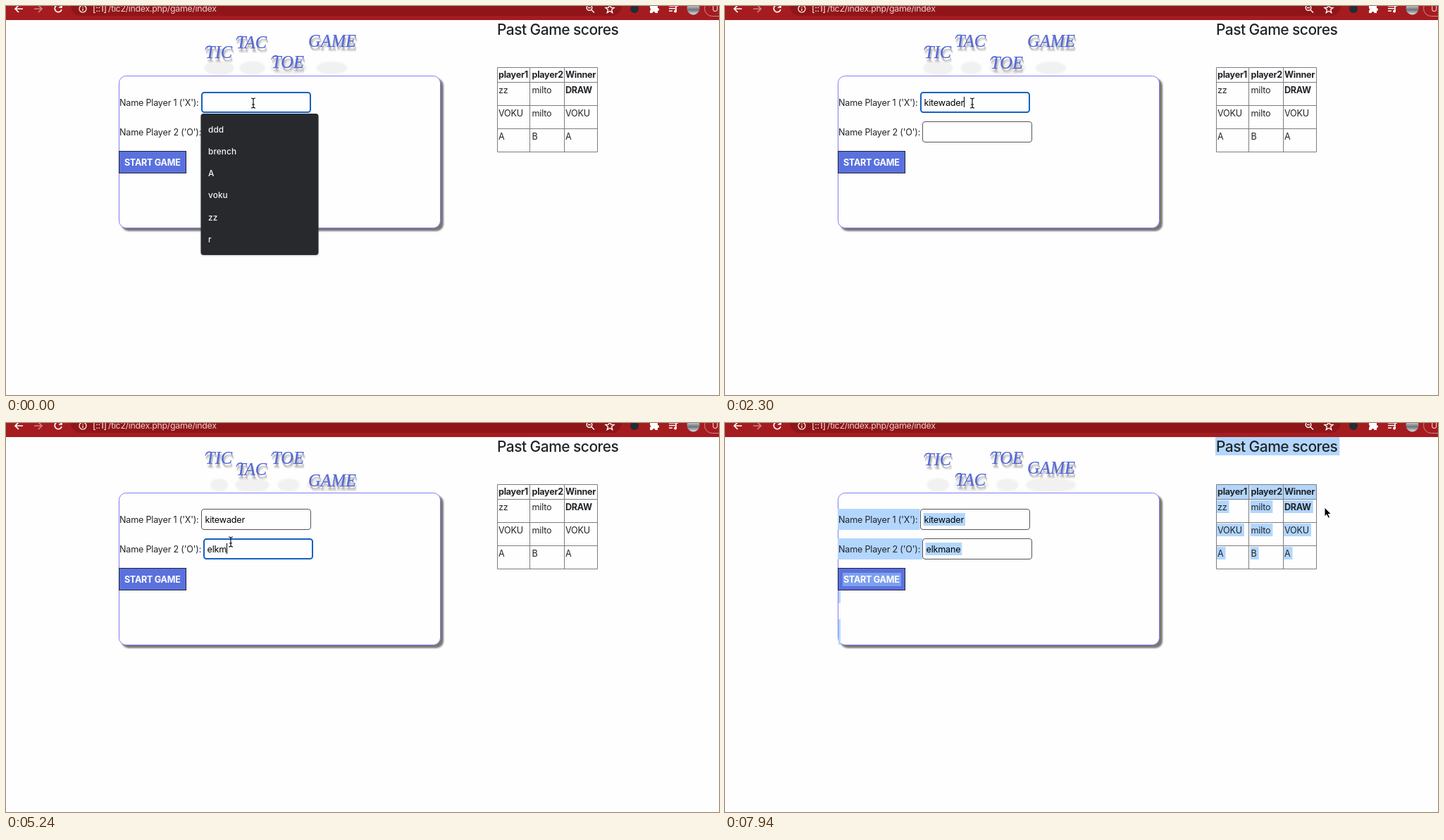
Write an HTML page that moves like this. It is 1012 by 553 pixels and loops after 8 s.

```html
<!DOCTYPE html>
<html lang="en">
<head>
<meta charset="utf-8">
<title>Tic Tac Toe</title>
<style>
  html, body { margin: 0; width: 100%; height: 100%; overflow: hidden; background: #fefefe; }
  svg { display: block; width: 1012px; height: 553px; }
  text { font: 12.6px Inter, "Open Sans", sans-serif; letter-spacing: -.2px; fill: #212529; white-space: pre; }
  .bold { font-weight: 700; letter-spacing: -.28px; }
  .typed { fill: #000; }
  .heading { font-size: 21px; font-weight: 500; letter-spacing: -.55px; }
  .url { font-size: 12.4px; letter-spacing: -.3px; fill: #eccfd0; }
  .item { font-size: 11.8px; font-weight: 500; letter-spacing: .1px; fill: #f4f4f5; }
  .word text { font: italic 24.5px "Liberation Serif", serif; letter-spacing: 0; stroke-width: .25; }
  .icon { fill: none; stroke: #fff; stroke-width: 1.7; }
</style>
</head>
<body>
<svg viewBox="0 0 1012 553">
  <defs>
    <filter id="soft" x="-10%" y="-10%" width="120%" height="120%"><feGaussianBlur stdDeviation="1"/></filter>
    <linearGradient id="face" x2="0" y2="1">
      <stop offset=".2" stop-color="#d5dadd"/><stop offset=".6" stop-color="#6d767c"/><stop offset="1" stop-color="#dde1e3"/>
    </linearGradient>
  </defs>

  <g id="title"></g>

  <rect x="164" y="103" width="457" height="217" rx="10" fill="#777" filter="url(#soft)"/>
  <rect x="160.5" y="99.5" width="456" height="216" rx="10" fill="#fefefe" stroke="#7d7df0"/>
  <g id="marks" fill="#b3d6fd"></g>
  <g id="labels"></g>
  <g id="fields"></g>
  <rect x="160.5" y="206.5" width="95" height="31" fill="#5a71de" stroke="#20243c"/>
  <rect id="buttonMark" x="167" y="213" width="83" height="19" fill="#7da0ee"/>
  <text class="bold" x="168" y="227" style="fill:#fff">START GAME</text>
  <path d="M697.5 87.5h142v120h-142zm46 0v120m49 -120v120m-95 -99h142m-142 33h142m-142 33h142" fill="none" stroke="#7d7d7d"/>

  <rect width="1012" height="20" fill="#a51c20"/>
  <rect x="92" y="-14" width="782" height="28" rx="14" fill="#901519"/>
  <g class="icon">
    <path d="M24 4H13M18 -1L13 4L18 9"/>
    <path d="M40 4H51M46 -1L51 4L46 9" opacity=".45"/>
    <path d="M78.5 1A5 5 0 1 0 79 5M79 -2V2H75"/>
    <g stroke-width="1.2"><circle cx="109" cy="4" r="5"/><path d="M109 3.5V7M109 1V2.2"/></g>
    <g stroke-width="1.4"><circle cx="828" cy="2.5" r="3.8"/><path d="M831 5.5L835 9.5M826 2.5H830"/>
      <path d="M857 -2L858.7 2.2L863 2.5L859.6 5.3L860.7 9.5L857 7.2L853.3 9.5L854.4 5.3L851 2.5L855.3 2.2Z"/></g>
    <path d="M941 0H950M941 3.5H950M941 7H946M951 7V0H954"/>
  </g>
  <circle cx="950" cy="7.5" r="2" fill="#fff"/>
  <circle cx="892" cy="4" r="6" fill="#262b35"/>
  <path d="M914 0H918A2 2 0 0 1 922 0H925V3A2 2 0 0 1 925 7V10H921.5A2 2 0 0 0 917.5 10H914V6.5A2 2 0 0 0 914 3Z" fill="#fff"/>
  <circle cx="975.5" cy="3.5" r="9" fill="url(#face)"/>
  <rect x="991.5" y="-8" width="60" height="22.5" rx="11" fill="none" stroke="#d18a8c"/>
  <text class="url" x="1002" y="8">Up</text>
  <text class="url" x="123" y="8" style="fill:#fff">[::1]</text>
  <text class="url" x="145" y="8">/tic2/index.php/game/index</text>

  <g id="menus"></g>
  <path id="beam" d="M-3 -7Q0 -7 0 -5Q0 -7 3 -7M0 -5V5M-3 7Q0 7 0 5Q0 7 3 7M-2 2H2" fill="none" stroke="#111" stroke-width="1.2"/>
  <path id="arrow" d="M0 0V13L3 10.3L5.2 15.2L7.5 14.2L5.3 9.5H9.4Z" fill="#000" stroke="#fff"/>
</svg>
<script>
const LOOP = 8000, TICK = 147.5, LEAD = 50;
const FOCUS_MOVES = 3450, BLUR = 7120, SELECT = 7700, BLINK = 530;
const $ = id => document.getElementById(id);

function add(parent, tag, attrs, text) {
  const el = document.createElementNS('http://www.w3.org/2000/svg', tag);
  set(el, attrs);
  if (text) el.textContent = text;
  return parent.appendChild(el);
}
function set(el, attrs) {
  for (const k in attrs) el.setAttribute(k, attrs[k]);
}
const show = (el, on) => set(el, { visibility: on ? 'visible' : 'hidden' });
const within = (t, [a, b]) => t >= a && t < b;
const linear = u => u;
const smooth = u => u * u * (3 - 2 * u);

// Interpolates rows of [time, ...values].
function mix(rows, t, ease) {
  let i = 0;
  while (i < rows.length - 2 && t >= rows[i + 1][0]) i++;
  const [a, b] = [rows[i], rows[i + 1]];
  const u = ease(Math.max(0, Math.min(1, (t - a[0]) / (b[0] - a[0]))));
  return a.slice(1).map((v, k) => v + (b[k + 1] - v) * u);
}

// Bouncing title: in each cycle of four quarters a word drops far, then half as far.
function height(p) {
  const d = p - .95, e = (p - 2.9) / .98;
  const deep = Math.max(0, 1 - (d / (d < 0 ? .36 : .93)) ** 2);
  const shallow = Math.abs(e) < 1 ? Math.cos(e * Math.PI / 2) ** 2 : 0;
  return 50 + 32 * deep + 16 * shallow;
}
const phase = [[0, .85], [1525, 5.9], [3147, 12.45], [4475, 16], [6097, 20.35], [7277, 24.6], [7867, 28.15]];

const blobs = add($('title'), 'g', { fill: '#f1f1f1', filter: 'url(#soft)' });
const words = [['TIC', 283, 39, 2], ['TAC', 327, 45, 1], ['TOE', 377, 48, 0], ['GAME', 429, 67, 3]]
  .map(([name, x, width, lag]) => {
    const blob = add(blobs, 'ellipse', { cx: x + width / 2, cy: 88 });
    const g = add($('title'), 'g', { class: 'word' });
    [[2, 6, '#d6d6d6'], [1, 4, '#bcbcbc'], [0, 0, '#5468d8']].forEach(([dx, dy, color]) => {
      add(g, 'text', { x: x + dx, y: 8 + dy, style: `fill:${color};stroke:${color}` }, name);
      if (name[0] === 'T') add(g, 'path', { d: `M${x + dx} ${dy - 3}q0 -7 8 -6`, fill: 'none', stroke: color });
    });
    return { g, blob, width, lag };
  });

function drawTitle(t) {
  const [p] = mix(phase, t, linear);
  for (const { g, blob, width, lag } of words) {
    const y = height((p + lag) % 4);
    const spread = Math.min(1.08, .65 + .08 * (y - 50));
    set(g, { transform: `translate(0 ${y})` });
    set(blob, { rx: width / 2 * spread, ry: 7 + 3 * spread });
  }
}

// Form fields with their typed text and suggestion menus.
function makeField(x, y, value, { focus, menu, from, rate, items }) {
  const textX = x + 5.5;
  const box = add($('fields'), 'rect', { fill: '#fefefe', rx: 3.5 });
  const mark = add($('fields'), 'rect', { x: textX - 1, y: y + 6, height: 18, fill: '#b3d6fd' });
  const text = add($('fields'), 'text', { class: 'typed', x: textX, y: y + 19.5 });
  const caret = add($('fields'), 'rect', { y: y + 7, width: 1, height: 15, fill: '#000' });
  const list = add($('menus'), 'g', {});
  const panel = { x: x - .5, width: 167, height: 201, rx: 4 };
  add(list, 'rect', { ...panel, y: y + 32, fill: '#777', opacity: .4, filter: 'url(#soft)' });
  add(list, 'rect', { ...panel, y: y + 31, fill: '#28292c' });
  items.forEach((item, i) =>
    add(list, 'text', { class: 'item', x: x + 10, y: y + 57.5 + i * 31.3 }, item));

  return t => {
    const active = within(t, focus);
    const line = active ? 2 : 1;
    set(box, { x: x + line / 2, y: y + line / 2, width: 156 - line, height: 30 - line,
      stroke: active ? '#1162c2' : '#565656', 'stroke-width': line });
    text.textContent = value.slice(0, Math.max(0, Math.floor((t - from) / rate) + 1));
    const end = text.textContent ? text.getComputedTextLength() : 0;
    const typing = within(t, [from, from + rate * (value.length - 1) + BLINK]);
    set(caret, { x: textX + end });
    set(mark, { width: end + 3 });
    show(caret, active && (typing || (t + 960) % (2 * BLINK) < BLINK));
    show(list, within(t, menu));
    show(mark, t >= SELECT);
  };
}

const fields = [
  makeField(277, 122, 'kitewader', {
    focus: [0, FOCUS_MOVES], menu: [0, 830], from: 830, rate: 160,
    items: ['ddd', 'brench', 'A', 'voku', 'zz', 'r']
  }),
  makeField(280, 164, 'elkmane', {
    focus: [FOCUS_MOVES, BLUR], menu: [3740, 4640], from: 4640, rate: 165,
    items: ['milto', 'dusk', 'B', 'ssd', 's', 'd']
  })
];

// Page text that is highlighted at the end; width defaults to the text's own.
function label(text, x, baseline, cls, top, height, width) {
  const el = add($('labels'), 'text', { x, y: baseline, class: cls }, text);
  add($('marks'), 'rect', { x: x - 1, y: top, width: width || el.getComputedTextLength() + 4, height });
}
label("Name Player 1 ('X'):", 161, 142, '', 122, 30);
label("Name Player 2 ('O'):", 161, 184, '', 164, 30);
label('Past Game scores', 697, 41, 'heading', 20, 26);
['player1', 'player2', 'Winner'].forEach((name, c) => label(name, 699 + c * 47.5, 102, 'bold', 88, 20, 47));
[['zz', 'milto', 'DRAW'], ['VOKU', 'milto', 'VOKU'], ['A', 'B', 'A']].forEach((row, r) =>
  row.forEach((cell, c) =>
    label(cell, 699 + c * 47.5, 123.5 + r * 33, cell === 'DRAW' ? 'bold' : '', 110 + r * 33, 18)));
add($('marks'), 'path', { d: 'M161 238h3v18h-3zm0 41h3v36h-3z' });

const pointer = [[2500, 351, 138], [3100, 316, 174], [3300, 316, 174], [3450, 319, 169], [6200, 319, 169],
  [6600, 470, 200], [7200, 731, 120], [7300, 731, 120], [7860, 851, 120]];

function draw(time) {
  const t = Math.max(0, LEAD + Math.floor((time - LEAD) / TICK) * TICK);
  drawTitle(t);
  fields.forEach(update => update(t));
  const transform = `translate(${mix(pointer, t, smooth)})`;
  const asArrow = t >= 6400;
  set($('beam'), { transform });
  set($('arrow'), { transform });
  show($('beam'), !asArrow);
  show($('arrow'), asArrow);
  show($('marks'), t >= SELECT);
  show($('buttonMark'), t >= SELECT);
}

const start = performance.now();
function loop() {
  draw((performance.now() - start) % LOOP);
  requestAnimationFrame(loop);
}
loop();
</script>
</body>
</html>
```
